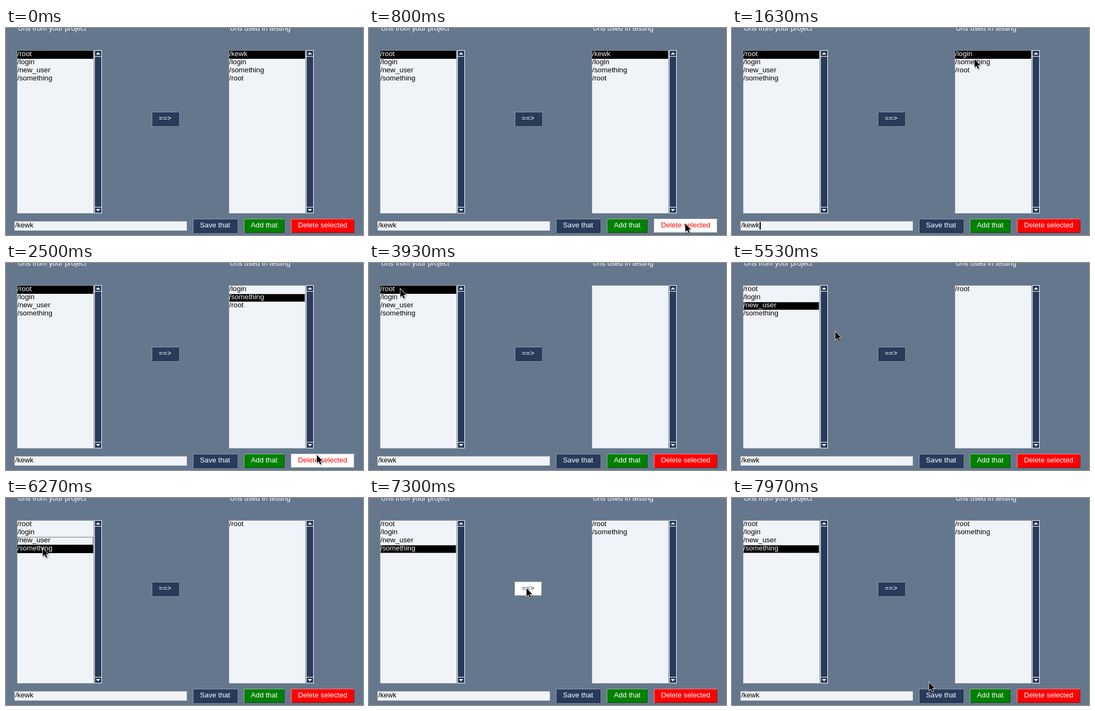
An HTML page with a canvas for the animation above (8000 ms loop, 659 by 383 pixels).

```html
<!DOCTYPE html>
<html lang="en">
<head>
<meta charset="utf-8">
<title>Url picker</title>
<style>
html, body { margin: 0; width: 100%; height: 100%; overflow: hidden; background: #64778d; }
canvas { display: block; }
</style>
</head>
<body>
<canvas id="stage" width="659" height="383"></canvas>
<script>
const ctx = document.getElementById('stage').getContext('2d');
const LOOP = 8000;
const ROW = 15, TOP = 42, LIST_W = 142, LIST_H = 302;
const BUTTON_H = 26, PRESS = 100;
const BG = '#64778d', FIELD = '#f0f3f7', NAVY = '#283b5b';

const BUTTONS = [
  { label: '==>', x: 269, y: 155, w: 50, color: NAVY, run: addPicked },
  { label: 'Save that', x: 345, y: 353, w: 82, color: NAVY },
  { label: 'Add that', x: 439, y: 353, w: 75, color: '#008000' },
  { label: 'Delete selected', x: 526, y: 353, w: 117, color: '#ff0000', run: deleteUsed }
];

// The script: eased pointer glides and the clicks made on the way
const ENTER = { x: 115, y: -4 }, SEND = { x: 290, y: 166 };
const GLIDES = [
  { from: 70, to: 830, x: 585, y: 363 },
  { from: 1330, to: 1630, x: 447, y: 57 },
  { from: 1930, to: 2500, x: 573, y: 354 },
  { from: 3500, to: 3770, x: 7, y: 12 },
  { from: 3770, to: 3930, x: 57, y: 47 },
  { from: 4190, to: 4540, ...SEND },
  { from: 4755, to: 5210, x: 72, y: 80 },
  { from: 5310, to: 5730, ...SEND },
  { from: 5830, to: 6130, x: 67, y: 92 },
  { from: 6370, to: 6530, ...SEND },
  { from: 7470, to: 7720, x: 540, y: 345 },
  { from: 7720, to: 7970, x: 363, y: 340, sag: 20 }
];
const CLICKS = [1330, 1900, 2730, 2900, 3330, 4170, 4630, 5220, 6265, 7300];

function pointer(t) {
  if (t < GLIDES[0].from) return null;
  let { x, y } = ENTER;
  for (const g of GLIDES) {
    if (t < g.from) break;
    const u = Math.min(1, (t - g.from) / (g.to - g.from));
    const e = u * u * (3 - 2 * u);
    x += (g.x - x) * e;
    y += (g.y - y) * e + 4 * (g.sag || 0) * e * (1 - e);
  }
  return { x: Math.round(x), y: Math.round(y) };
}

const inside = (p, x, y, w, h) => p && p.x >= x && p.x < x + w && p.y >= y && p.y < y + h;
const overButton = (p, b) => inside(p, b.x, b.y, b.w, BUTTON_H);

function addPicked({ project, used }) {
  used.items.push(project.items[project.selected]);
}

function deleteUsed({ used }) {
  used.items.splice(used.selected, 1);
  used.selected = used.items.length ? 0 : -1;
  used.active = 0;
}

// Replays every click up to t and returns the resulting form
function formAt(t) {
  const makeList = (x, ...items) => ({ x, items, selected: 0, active: 0 });
  const form = {
    project: makeList(20, '/root', '/login', '/new_user', '/something'),
    used: makeList(411, '/kewk', '/login', '/something', '/root'),
    focus: null
  };
  for (const time of CLICKS) {
    if (t < time) break;
    const p = pointer(time);
    const button = BUTTONS.find(b => overButton(p, b));
    if (button) {
      button.run(form);
      form.focus = form.focus || 'entry';
      continue;
    }
    const list = [form.project, form.used].find(l => inside(p, l.x, TOP, LIST_W, LIST_H));
    list.selected = Math.floor((p.y - TOP) / ROW);
    if (t >= time + PRESS) list.active = list.selected;
    form.focus = list;
  }
  return form;
}

function rect(x, y, w, h, color) {
  ctx.fillStyle = color;
  ctx.fillRect(x, y, w, h);
}

function text(str, x, y, color) {
  ctx.fillStyle = color;
  ctx.fillText(str, x, y);
}

function shades(hex) {
  const rgb = [1, 3, 5].map(i => parseInt(hex.slice(i, i + 2), 16));
  const css = f => `rgb(${rgb.map(f).map(Math.round).join(',')})`;
  const bright = rgb[1] > 242;
  return {
    light: css(c => bright ? c * 0.9 : Math.max(Math.min(255, c * 1.4), (255 + c) / 2)),
    dark: css(c => c * 0.6)
  };
}

function panel(x, y, w, h, color, sunken) {
  const { light, dark } = shades(color);
  rect(x, y, w, h, sunken ? dark : light);
  rect(x + 1, y + 1, w - 1, h - 1, sunken ? light : dark);
  rect(x + 1, y + 1, w - 2, h - 2, color);
}

function ring(x, y, w, h, color) {
  ctx.strokeStyle = color;
  ctx.lineWidth = 1;
  ctx.setLineDash([1, 1]);
  ctx.lineDashOffset = 0.5;
  ctx.strokeRect(x + 0.5, y + 0.5, w - 1, h - 1);
  ctx.setLineDash([]);
}

function arrow(x, y, dir) {
  ctx.fillStyle = '#fff';
  ctx.beginPath();
  ctx.moveTo(x - 4, y + 2 * dir);
  ctx.lineTo(x + 4, y + 2 * dir);
  ctx.lineTo(x, y - 2 * dir);
  ctx.fill();
}

function scrollbar(x) {
  const y = TOP - 1, w = 14, cap = 11;
  rect(x, y, w, LIST_H, '#fff');
  rect(x + 1, y + 1, w - 2, LIST_H - 2, NAVY);
  rect(x, y + cap, w, 1, '#fff');
  rect(x, y + LIST_H - cap - 1, w, 1, '#fff');
  arrow(x + w / 2, y + 6, 1);
  arrow(x + w / 2, y + LIST_H - 6, -1);
}

function drawList({ x, items, selected, active }, focused) {
  panel(x, TOP - 1, LIST_W, LIST_H, FIELD, true);
  items.forEach((item, i) => {
    const y = TOP + i * ROW, on = i === selected;
    const ink = on ? FIELD : '#000';
    if (on) rect(x + 1, y, LIST_W - 2, ROW, '#000');
    text(item, x + 1, y + 10, ink);
    if (focused && i === active) ring(x + 1, y, LIST_W - 2, ROW, ink);
  });
  scrollbar(x + LIST_W + 1);
}

function drawButton(b, p) {
  const hover = overButton(p, b);
  panel(b.x, b.y, b.w, BUTTON_H, hover ? '#ffffff' : b.color);
  text(b.label, b.x + 13, b.y + 16, hover ? b.color : '#fff');
}

function cursor({ x, y }) {
  const tip = new Path2D('M0 0V15L3.4 11.8L6 17.4L8.2 16.4L5.8 11H10.4Z');
  ctx.save();
  ctx.translate(x + 0.8, y + 1);
  ctx.shadowColor = 'rgba(0,0,0,.4)';
  ctx.shadowBlur = 2;
  ctx.shadowOffsetX = ctx.shadowOffsetY = 1;
  ctx.lineWidth = 1.6;
  ctx.strokeStyle = '#f4f4f4';
  ctx.stroke(tip);
  ctx.shadowColor = 'transparent';
  ctx.fillStyle = '#000';
  ctx.fill(tip);
  ctx.restore();
}

function draw(t) {
  const p = pointer(t), { project, used, focus } = formAt(t);
  rect(0, 0, 659, 383, BG);
  ctx.font = '13.2px "Liberation Sans", Arial, sans-serif';
  text('Urls from your project', 22, 5, '#fff');
  text('Urls used in testing', 413, 5, '#fff');
  for (const list of [project, used]) drawList(list, focus === list);
  panel(15, 357, 319, 18, FIELD, true);
  text('/kewk', 17, 369, '#000');
  if (focus === 'entry') rect(51, 359, 2, 14, '#000');
  for (const b of BUTTONS) drawButton(b, p);
  if (p) cursor(p);
}

function tick() {
  draw(performance.now() % LOOP);
  requestAnimationFrame(tick);
}
tick();
</script>
</body>
</html>
```
